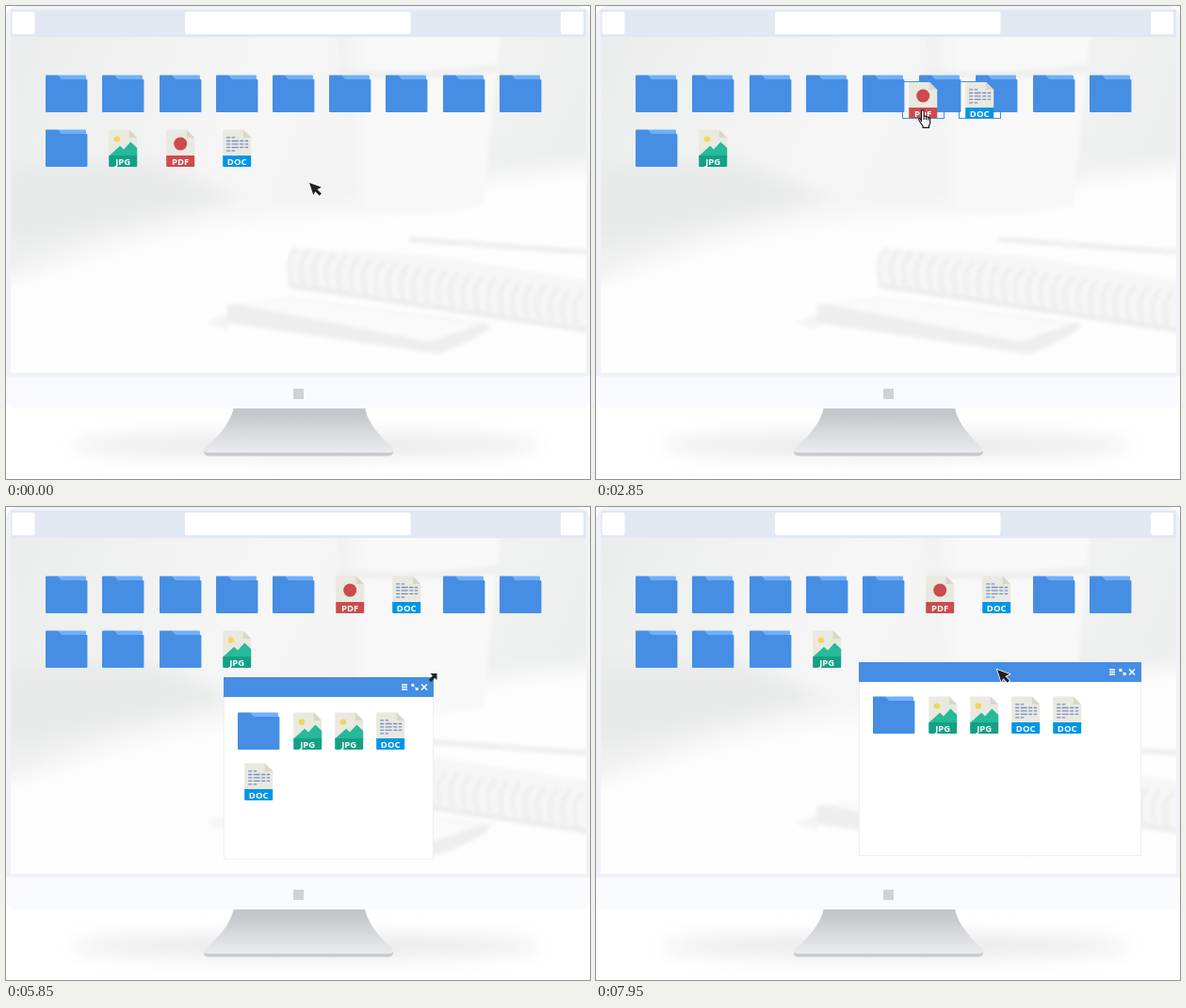
Write an HTML page that moves like this. It is 620 by 503 pixels and loops after 8 s.

```html
<!DOCTYPE html>
<html lang="en">
<head>
<meta charset="utf-8">
<title>Desktop file manager</title>
<style>
html, body { margin: 0; width: 100%; height: 100%; overflow: hidden; background: #fff; }
svg { display: block; width: 620px; height: 503px; }
text { font: 700 9.5px "Open Sans", "Noto Sans", sans-serif; fill: #fff; text-anchor: middle; }
.pick { fill: none; stroke: #458ee4; }
</style>
</head>
<body>
<svg viewBox="0 0 620 503">
  <defs>
    <filter id="soft" x="-20%" y="-20%" width="140%" height="140%"><feGaussianBlur stdDeviation="2"/></filter>
    <filter id="haze" x="-40%" y="-80%" width="180%" height="260%"><feGaussianBlur stdDeviation="10"/></filter>
    <clipPath id="screen"><path d="M5 33H616V390H5Z"/></clipPath>
    <linearGradient id="wall" x2="1" y2=".25">
      <stop stop-color="#ebecec"/><stop offset=".45" stop-color="#f5f6f5"/><stop offset="1" stop-color="#edeeee"/>
    </linearGradient>
    <linearGradient id="cup">
      <stop stop-color="#f0f0f0"/><stop offset=".2" stop-color="#f8f8f8"/><stop offset="1" stop-color="#f8f8f8"/>
    </linearGradient>
    <linearGradient id="neck" x2="0" y2="1">
      <stop stop-color="#c2c3c7"/><stop offset=".25" stop-color="#c9cace"/>
      <stop offset=".6" stop-color="#dadbdf"/><stop offset="1" stop-color="#eaebee"/>
    </linearGradient>

    <g id="folder">
      <path fill="#6fb0fa" d="M13 .6H41.500Q43 .6 43 2V8H13Z"/>
      <path fill="#458ee4" d="M0 1.500Q0 .5 1 .5H13L17 5H43.500Q44.400 5 44.400 6V39Q44.400 40 43.500 40H1Q0 40 0 39Z"/>
    </g>
    <g id="page">
      <path fill="#e9e9e0" d="M0 1.300Q0 0 1 0H21.300L30 8.700V28H0Z"/>
      <path fill="#d9d7ca" d="M21.700 .1V8.400H30Z"/>
    </g>
    <path id="label" d="M0 27.500H30V38.500Q30 39.500 29 39.500H1Q0 39.500 0 38.500Z"/>
    <g id="jpg">
      <use href="#page"/>
      <circle cx="8.700" cy="10.100" r="3.200" fill="#f3d55b"/>
      <path fill="#26b99a" d="M0 28L11.900 17.200L15.800 21L23.100 13L30 19.600V28Z"/>
      <use href="#label" fill="#14a085"/>
      <text x="15" y="37">JPG</text>
    </g>
    <g id="pdf">
      <use href="#page"/>
      <circle cx="15" cy="15" r="7" fill="#cc4b4c"/>
      <use href="#label" fill="#cc4b4c"/>
      <text x="15" y="37">PDF</text>
    </g>
    <g id="doc">
      <use href="#page"/>
      <path stroke="#7a8dc8" stroke-width="1.400" stroke-dasharray="4 1.500 7 1.500"
        d="M4 8.400H13M4 12H27M4 15.400H27M4 18.900H27M4 22.400H13"/>
      <use href="#label" fill="#0096e6"/>
      <text x="15" y="37">DOC</text>
    </g>

    <path id="arrow" fill="#231f20" stroke="#fff" stroke-width="1.600" paint-order="stroke"
      d="M0 0L13 4.800L8.400 7L13 11.600L10.800 13.800L6.300 9.200L4.300 13Z"/>
    <path id="hand" fill="#fff" stroke="#111" stroke-width="1.100" stroke-linejoin="round"
      d="M3.500 12.500V2Q3.500 .6 4.800 .6T6.200 2V7.500Q7.500 6.300 8.600 8Q9.900 7 10.800 8.700Q12.600 8.200 12.600 10V14.500Q12.500 16 11.500 17V19.400H5V17.300Q3 15 .8 11.200Q.3 9.600 1.600 9.600Q2.600 10 3.500 12.500ZM6.200 7.500V11M8.600 8V11M10.800 8.700V11.500"/>
    <path id="resize" fill="#231f20" d="M1.500 0H8.500V7L6.200 4.700L2.200 9L0 6.700L4 2.400Z"/>
  </defs>

  <!-- monitor -->
  <ellipse cx="318" cy="467" rx="250" ry="13" fill="#e9e9e9" filter="url(#haze)"/>
  <path fill="url(#neck)" d="M242 426H381Q383 445 410 470Q412 474 408 475H213Q209 474 211 470Q238 448 242 426Z"/>
  <path fill="#c9cacd" d="M210 473Q211 475 214 475H407Q410 475 411 473V475Q410 478.500 405 478.500H216Q211 478.500 210 475Z"/>
  <rect width="620" height="428" rx="13" fill="#f0f2f6"/>
  <path fill="#f9faff" d="M0 394H620V415Q620 428 607 428H13Q0 428 0 415Z"/>
  <rect x="305" y="407" width="11" height="11" fill="#cfd1d6"/>
  <path fill="#e1e8f1" d="M5 4H616V33H5Z"/>
  <g fill="#fff">
    <rect x="6.500" y="6" width="24" height="24" rx="2"/>
    <rect x="190" y="6" width="239.500" height="24" rx="2"/>
    <rect x="589" y="6" width="24" height="24" rx="2"/>
  </g>

  <!-- wallpaper -->
  <g clip-path="url(#screen)">
    <path fill="url(#wall)" d="M5 33H616V390H5Z"/>
    <path fill="#e8e9e9" filter="url(#haze)" d="M0 170L150 165L250 205L0 255Z"/>
    <path fill="#fdfdfd" filter="url(#haze)" d="M-30 300L130 250L260 225L380 215L530 180L660 165V430H-30Z"/>
    <path fill="url(#cup)" filter="url(#soft)" d="M350 20H526L507 212Q440 228 372 218Z"/>
    <path fill="#efefef" filter="url(#soft)" d="M350 66Q440 74 522 62V70Q440 82 352 74Z"/>
    <g filter="url(#soft)">
      <path fill="#f6f6f6" d="M305 258L450 265L625 293V345L520 330L300 297Z"/>
      <path fill="#eeeeee" d="M235 318L300 310L515 338Q512 350 460 370L235 337Z"/>
      <path fill="#fafafa" d="M245 317L300 311L505 338L450 357Z"/>
      <path fill="#f4f4f4" d="M212 336L235 328V345Z"/>
      <path fill="none" stroke="#ebebeb" stroke-width="5" d="M428 248L620 262M300 297L520 330L620 345"/>
    </g>
    <g id="rings" fill="none" stroke="#e9e9e9" stroke-width="3" filter="url(#soft)"></g>
  </g>

  <g id="desk"></g>
  <g id="drag"></g>
  <g id="win">
    <rect id="body" x=".5" y=".5" fill="#fff" stroke="#eeeff1"/>
    <rect id="bar" height="21" fill="#458ee4"/>
    <g id="tools" fill="none" stroke="#fff" stroke-width="1.300">
      <path d="M-34 8H-28M-34 10.500H-28M-34 13H-28"/>
      <path d="M-23 10V7.700H-20.700M-23 7.700L-20.500 10M-17 11V13.300H-19.300M-17 13.300L-19.500 11"/>
      <path d="M-13 7.500L-7 13.500M-7 7.500L-13 13.500" stroke-width="1.500"/>
    </g>
    <g id="items"></g>
  </g>
  <use id="cursor"/>
</svg>
<script>
const $ = id => document.getElementById(id);
const move = (el, x, y) => el.setAttribute('transform', `translate(${x} ${y})`);
const size = (el, w, h) => { el.setAttribute('width', w); el.setAttribute('height', h); };
const ramp = (t, from, to) => Math.min(1, Math.max(0, (t - from) / (to - from)));

const use = (kind, x, y) => `<use href="#${kind}" x="${x}" y="${y}"/>`;
const icon = (kind, x, y) => kind === 'folder' ? use(kind, x, y) : use(kind, x + 7.2, y + .5);
const outline = (x, y) => `<rect class="pick" x="${x + .5}" y="${y + .5}" width="44" height="39"/>`;
const slot = i => [Math.round(42.2 + i % 9 * 60.2), i < 9 ? 73 : 131];
const grid = kinds => kinds.map((k, i) => icon(k, ...slot(i))).join('');

const folders = n => Array(n).fill('folder');
const before = grid([...folders(10), 'jpg']);
const after = grid([...folders(5), 'pdf', 'doc', ...folders(5), 'jpg']);

// Top left cell corner of the dragged PDF; the DOC rides one cell to its right
function pdfAt(t) {
  const p = ramp(t, 1650, 3000);
  return [Math.round(163 + 182 * p), Math.round(131 - 57 * p)];
}

// Pulled wider by its corner, then dragged right with a small step back
function windowAt(t) {
  const wide = ramp(t, 5700, 6630), tall = Math.min(1, wide * 1.6), drag = ramp(t, 7200, 7650);
  return {
    x: Math.round(231 + 54 * drag - 6 * ramp(t, 7650, 7950)),
    y: Math.round(185 - 15 * tall - 5 * drag),
    w: Math.round(208 + 92 * wide),
    h: Math.round(190 + 16 * tall),
    top: Math.round(36 + 3 * Math.sin(Math.PI * wide))
  };
}

// Each glide ends on a point that may itself be moving
function pointerAt(t, win) {
  const [px, py] = pdfAt(t);
  const glides = [
    [0, 600, 229, 162],
    [900, 1350, px + 17, py + 30],
    [3150, 4350, 186, 160],
    [4650, 5100, 315, 181],
    [5100, 5700, win.x + win.w - 5, win.y - 4],
    [6600, 7200, win.x + 147, win.y + 8]
  ];
  return glides.reduce(([x, y], [from, to, gx, gy]) => {
    const p = ramp(t, from, to);
    return [x + (gx - x) * p, y + (gy - y) * p];
  }, [322, 188]);
}

function drawDrag(t) {
  if (t >= 3150) return '';
  const [x, y] = pdfAt(t);
  return icon('pdf', x, y) + icon('doc', x + 60, y) +
    (t >= 1350 ? outline(x, y) : '') + (t >= 750 ? outline(x + 60, y) : '');
}

function drawWindow(t, { x, y, w, h, top }) {
  $('win').style.display = t < 4650 ? 'none' : '';
  move($('win'), x, y);
  size($('body'), w - 1, h - 1);
  size($('bar'), w, 21);
  move($('tools'), w, 0);
  const last = w >= 290 ? [199, top] : [15, top + 54];
  $('items').innerHTML = icon('folder', 15, top) +
    ['jpg', 'jpg', 'doc'].map((k, i) => icon(k, 67 + 44 * i, top)).join('') + icon('doc', ...last);
}

function drawCursor(t, win) {
  const kind = t >= 600 && t <= 3150 ? 'hand' : t >= 5700 && t <= 6600 ? 'resize' : 'arrow';
  $('cursor').setAttribute('href', '#' + kind);
  move($('cursor'), ...pointerAt(t, win).map(Math.round));
}

let shown = -1;
function tick(now) {
  const t = Math.floor(now % 8000 / 150) * 150;
  if (t !== shown) {
    shown = t;
    const win = windowAt(t);
    $('desk').innerHTML = t < 3150 ? before : after;
    $('drag').innerHTML = drawDrag(t);
    drawWindow(t, win);
    drawCursor(t, win);
  }
  requestAnimationFrame(tick);
}

let coils = '';
for (let i = 0; i < 24; i++) {
  const x = 303 + i * 13.2, y = 258 + i * 2;
  coils += `<path d="M${x} ${y + 36}Q${x - 8} ${y + 10} ${x + 6} ${y}"/>`;
}
$('rings').innerHTML = coils;
tick(0);
</script>
</body>
</html>
```
